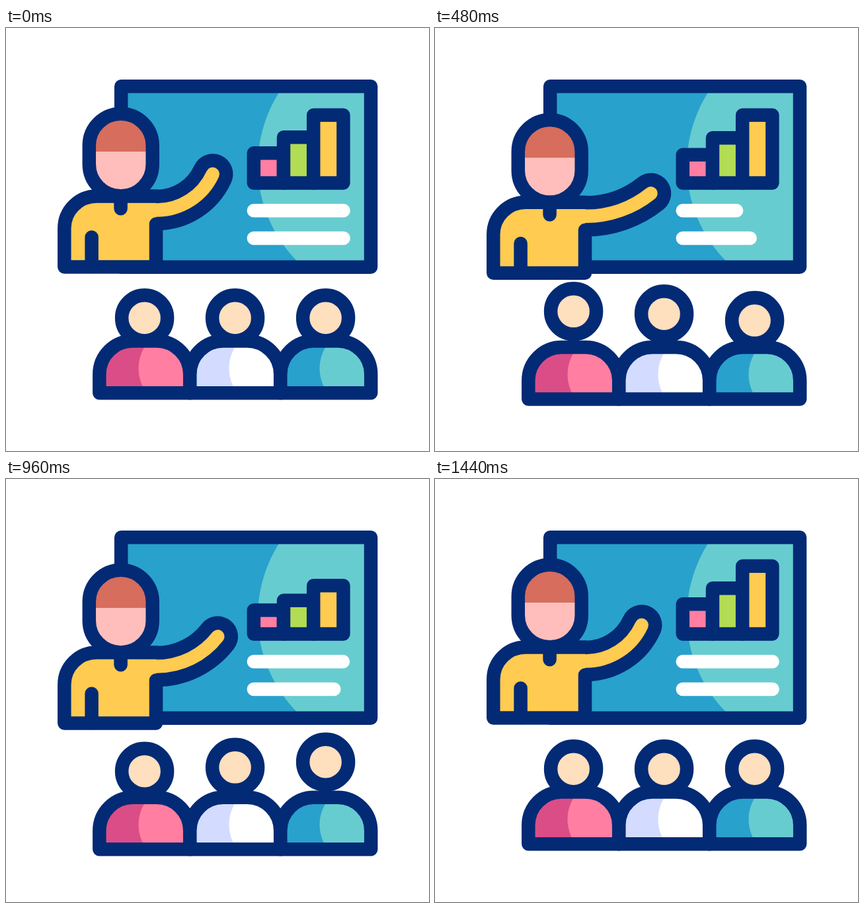
An HTML page with a canvas for the animation above (1560 ms loop, 640x640 px).

```html
<!DOCTYPE html>
<html lang="en">
<head>
<meta charset="utf-8">
<title>Presentation</title>
<style>
  html, body { margin: 0; height: 100%; overflow: hidden; background: #fff; }
  canvas { display: block; width: 100vw; height: 100vh; }
</style>
</head>
<body>
<canvas width="640" height="640"></canvas>
<script>
const ctx = document.querySelector('canvas').getContext('2d');
const LOOP = 1560, STEP = 40, LINE = 20.5;
const NAVY = '#032a75', BLUE = '#28a1cd', TEAL = '#67ccd0', YELLOW = '#ffcb50', PINK = '#ff7ea1';

// Closed form of cubic-bezier(.5, 0, .5, 1)
function ease(x) {
  const d = Math.min(1, Math.max(0, x)) - 0.5;
  const s = 0.5 + Math.sinh(Math.asinh(4 * d) / 3);
  return s * s * (3 - 2 * s);
}

// Rises from 0 to 1 over [a, b] and falls back over [c, d]
const swing = (t, a, b, c, d) => Math.min(ease((t - a) / (b - a)), 1 - ease((t - c) / (d - c)));

function fill(path, color) {
  ctx.fillStyle = color;
  ctx.fill(path);
}

function stroke(path, color = NAVY, width = LINE) {
  ctx.strokeStyle = color;
  ctx.lineWidth = width;
  ctx.stroke(path);
}

function clipped(path, draw) {
  ctx.save();
  ctx.clip(path);
  draw();
  ctx.restore();
}

function shifted(x, y, draw) {
  ctx.save();
  ctx.translate(x, y);
  draw();
  ctx.restore();
}

function circle(x, y, r) {
  const path = new Path2D();
  path.arc(x, y, r, 0, 2 * Math.PI);
  return path;
}

function rect(x, y, w, h, r = 0) {
  const path = new Path2D();
  path.roundRect(x, y, w, h, r);
  return path;
}

const screen = rect(174.2, 88.2, 377.8, 273.5);
const bars = [
  { top: 189.2, dip: 12, color: PINK },
  { top: 165.3, dip: 19.4, color: '#b2dc53' },
  { top: 131.8, dip: 29.5, color: YELLOW },
];

function drawScreen(t) {
  fill(screen, BLUE);
  clipped(screen, () => fill(circle(587, 208, 206), TEAL));
  stroke(screen);
  bars.forEach(({ top, dip, color }, i) => {
    const start = 320 + 80 * i;
    const y = top + dip * swing(t, start, start + 480, start + 480, start + 945);
    const bar = rect(374.8 + 45.2 * i, y, 45.2, 234.6 - y);
    fill(bar, color);
    stroke(bar);
  });
  [276.2, 318].forEach((y, i) => {
    const start = 120 + 120 * i;
    const end = 510.6 - 57.5 * swing(t, start, start + 440, start + 440, start + 880);
    stroke(new Path2D(`M374.8 ${y}H${end}`), '#fff');
  });
}

const torso = new Path2D('M227 296.5V361.5H88.3V303A48.6 48.6 0 0 1 136.9 254.4H228');
const details = new Path2D('M129.6 316.6V361M173.6 254V273.2');
const face = rect(125.8, 129.7, 95.9, 124.6, 47.95);

function drawPresenter(t) {
  // The arm is an arc of constant length that straightens and bends
  const bend = (65.5 - 30.5 * swing(t, 40, 640, 640, 1240)) * Math.PI / 180;
  const radius = 106.5 / bend;
  const arm = new Path2D('M216 275.5H228');
  arm.arc(228, 275.5 - radius, radius, Math.PI / 2, Math.PI / 2 - bend, true);

  stroke(arm, NAVY, 3 * LINE);
  fill(torso, YELLOW);
  stroke(torso);
  stroke(arm, YELLOW);
  stroke(details);
  fill(face, '#ffbebb');
  clipped(face, () => fill(rect(120, 120, 110, 67), '#d66d5d'));
  stroke(face);
}

const bust = new Path2D(
  'M141.3 552.2V524A50.4 50.4 0 0 1 191.7 473.6H227.8A50.4 50.4 0 0 1 278.2 524V552.2Z');
const audience = [
  { dark: '#db4d87', light: PINK, nod: [60, 635, 615, 1135] },
  { dark: '#d3dcfe', light: '#fff', nod: [160, 690, 668, 1238] },
  { dark: BLUE, light: TEAL, nod: [265, 860, 795, 1354] },
];

function drawListener(t, { dark, light, nod }) {
  const head = circle(209.6, 438.7 - 22 * swing(t, ...nod), 34.5);
  fill(head, '#fedfbe');
  stroke(head);
  fill(bust, dark);
  clipped(bust, () => fill(circle(262.5, 515, 62), light));
  stroke(bust);
}

function frame(now) {
  const t = Math.floor(now % LOOP / STEP) * STEP;
  const sink = 12 * swing(t, 40, 715, 690, 1350);
  ctx.fillStyle = '#fff';
  ctx.fillRect(0, 0, 640, 640);
  ctx.lineCap = ctx.lineJoin = 'round';
  drawScreen(t);
  shifted(0, sink, () => drawPresenter(t));
  audience.forEach((listener, i) => shifted(137 * i, sink, () => drawListener(t, listener)));
}

const began = performance.now();
function tick() {
  frame(performance.now() - began);
  requestAnimationFrame(tick);
}
tick();
</script>
</body>
</html>
```
